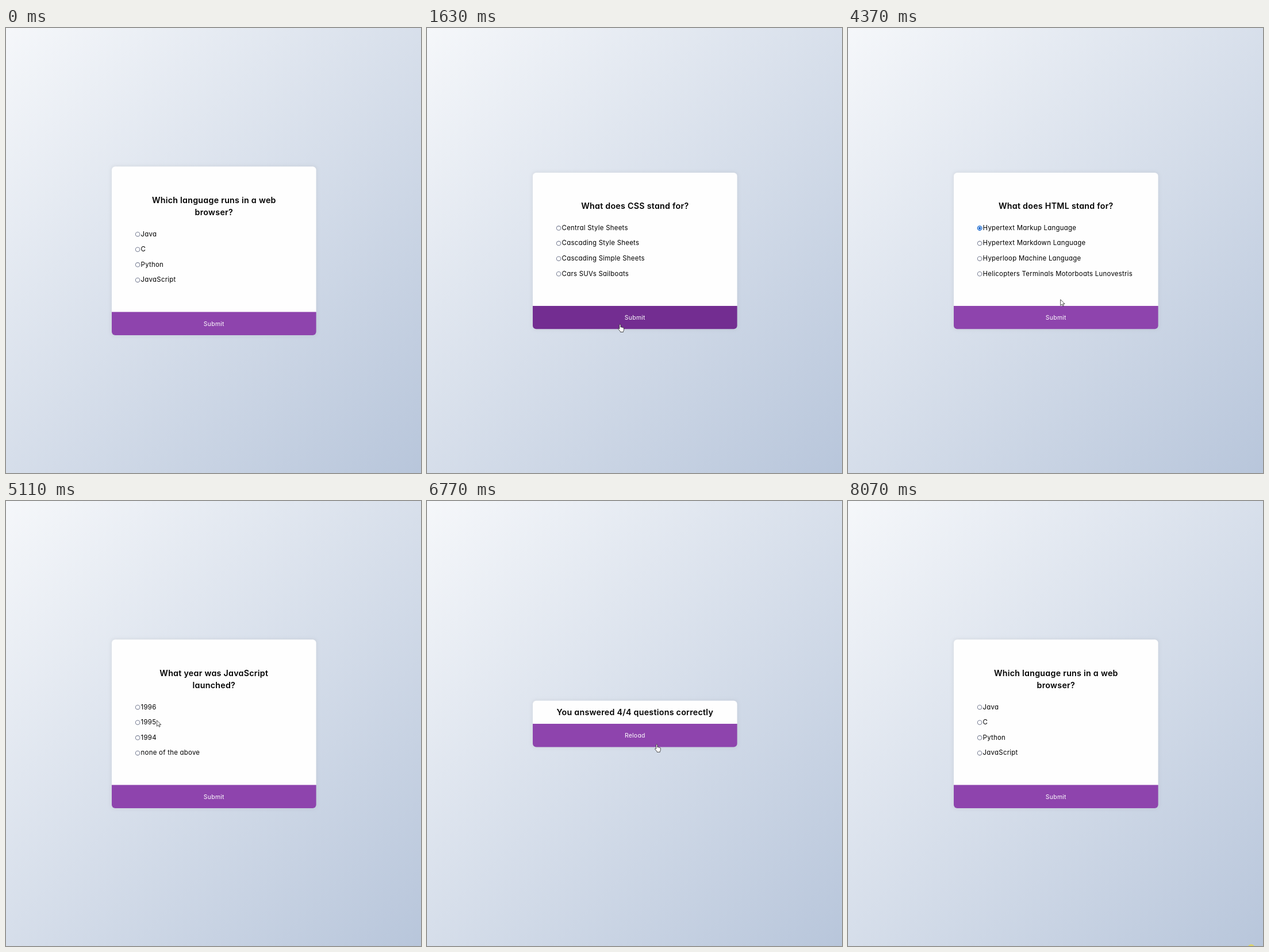
These frames come from a looping animation (722x775 px, 8140 ms). An HTML page:

```html
<!DOCTYPE html>
<html lang="en">
<head>
<meta charset="utf-8">
<title>Quiz</title>
<style>
  html, body { margin: 0; width: 100%; height: 100%; overflow: hidden; }
  body { background: linear-gradient(315deg, #b8c6db, #f5f7fa); }
  svg { display: block; width: 722px; height: 775px; }
  text { font-family: Inter, "Open Sans", sans-serif; font-feature-settings: "cv11"; letter-spacing: .27px; }
  .title { font-size: 14.24px; font-weight: 600; text-anchor: middle; }
  .option { font-size: 11.4px; }
  .action { font-size: 10.44px; fill: #fff; text-anchor: middle; }
  .shadow { fill: rgba(100, 100, 100, .1); filter: blur(3px); }
  .panel { fill: #fefefe; }
  .button { fill: #8e44ad; }
  .button.hover { fill: #732d91; }
  .ring { fill: #fff; stroke: #7d8398; stroke-width: 1.1; }
  .dot { fill: #0a5fcc; visibility: hidden; }
  .on .ring { stroke: #0a5fcc; stroke-width: 1.3; }
  .on .dot { visibility: visible; }
  .pointer { fill: #fff; stroke: #222; stroke-width: .8; stroke-linejoin: round; }
</style>
</head>
<body>
<svg viewBox="0 0 722 775">
  <g id="screens"></g>
  <circle id="spot" cx="701.5" cy="778.5" r="6.5" fill="#ddd56c"/>
  <g id="cursor">
    <path id="arrow" class="pointer" d="M.4.4V10.8L2.8 8.6 4.5 12 6.1 11.3 4.5 8H7.8Z"/>
    <path id="hand" class="pointer" d="M-1.2 8V1.1a1.1 1.1 0 0 1 2.2 0V5q1.8-.6 2 .4 1.7-.4 1.9.5 1.6-.2 1.6.9v2.6q0 1.6-1 3V13.5H.4V12.6L-3 8.6q-.6-1 .4-1.4.8 0 1.4.8Z"/>
  </g>
</svg>
<script>
const LOOP = 8140, ENTER = 450, RELOAD = 7030, EXIT = 7870, SPOT = 8070;
const STEP = (EXIT - ENTER) / 107, PAUSE = 70;
const rem = 16 * .593;
const LINE = 2.25 * rem, ROW = 2.8 * rem, BUTTON_H = 4.25 * rem;
const CENTER_X = 361.8, CENTER_Y = 388.1, LEFT = 184, RIGHT = 539.6, LABEL_X = 234.6;

// from: time shown, picked: time the answer is chosen, press: where Submit is clicked
const SCREENS = [
  { title: ["Which language runs in a web", "browser?"],
    options: ["Java", "C", "Python", "JavaScript"],
    from: 0, answer: 3, picked: 1280, press: [336, 516] },
  { title: ["What does CSS stand for?"],
    options: ["Central Style Sheets", "Cascading Style Sheets", "Cascading Simple Sheets", "Cars SUVs Sailboats"],
    from: 1560, answer: 1, picked: 2890, press: [364, 489] },
  { title: ["What does HTML stand for?"],
    options: ["Hypertext Markup Language", "Hypertext Markdown Language", "Hyperloop Machine Language",
      "Helicopters Terminals Motorboats Lunovestris"],
    from: 3520, answer: 0, picked: 3940, press: [394, 502] },
  { title: ["What year was JavaScript", "launched?"],
    options: ["1996", "1995", "1994", "none of the above"],
    from: 4650, answer: 1, picked: 5160, press: [390, 512] },
  { title: ["You answered 4/4 questions correctly"], options: [], action: "Reload", from: 5570 }
];

const $ = id => document.getElementById(id);
const show = (node, visible) => node.setAttribute("visibility", visible ? "visible" : "hidden");

function add(parent, tag, attrs, text = "") {
  const node = document.createElementNS("http://www.w3.org/2000/svg", tag);
  for (const key in attrs) node.setAttribute(key, attrs[key]);
  node.textContent = text;
  return parent.appendChild(node);
}

function build(screen) {
  const { title, options, action = "Submit" } = screen;
  const quiz = options.length > 0;
  const height = (quiz ? 26.45 : 6.25) * rem + LINE * title.length;
  const top = CENTER_Y - height / 2, bottom = top + height, buttonTop = bottom - BUTTON_H;
  const group = add($("screens"), "g", {});
  add(group, "rect", { class: "shadow", x: LEFT - 1, y: top - 1, width: RIGHT - LEFT + 2, height: height + 2, rx: 6 });
  add(group, "path", { class: "panel",
    d: `M${LEFT} ${buttonTop + .5}V${top + 6}a6 6 0 0 1 6-6H${RIGHT - 6}a6 6 0 0 1 6 6V${buttonTop + .5}Z` });
  const button = add(group, "path", { class: "button",
    d: `M${LEFT} ${buttonTop}H${RIGHT}V${bottom - 6}a6 6 0 0 1-6 6H${LEFT + 6}a6 6 0 0 1-6-6Z` });
  title.forEach((line, i) => add(group, "text", {
    class: "title", x: CENTER_X, y: top + (quiz ? 5 : 1) * rem + 15.8 + i * LINE
  }, line));
  const rows = options.map((label, i) => {
    const y = buttonTop - 132 + i * ROW;
    const row = add(group, "g", {});
    add(row, "circle", { class: "ring", cx: 229.1, cy: y - 3.4, r: 3.7 });
    add(row, "circle", { class: "dot", cx: 229.1, cy: y - 3.4, r: 2.1 });
    const text = add(row, "text", { class: "option", x: LABEL_X, y }, label);
    return { row, y, right: LABEL_X + text.getComputedTextLength() };
  });
  add(group, "text", { class: "action", x: CENTER_X, y: buttonTop + 23.9 }, action);
  Object.assign(screen, { group, button, rows, buttonTop, bottom });
}

// Each question: travel to the answer, rest there, then travel to the button and rest.
function buildPath() {
  const path = [[ENTER, 713, 763]];
  SCREENS.slice(0, -1).forEach((s, i) => {
    const answer = [262, s.rows[s.answer].y - 7.6], next = SCREENS[i + 1].from;
    path.push([s.picked - PAUSE, ...answer], [s.picked + PAUSE, ...answer],
      [next - PAUSE, ...s.press], [next + 2 * PAUSE, ...s.press]);
  });
  return path.concat([[5860, 430, 518], [6130, 430, 518], [6270, 562, 553],
    [6960, 385, 412], [RELOAD, 385, 412], [7800, 685, 763]]);
}

function tipAt(t) {
  const i = path.findIndex(stop => stop[0] > t);
  if (i <= 0) return path.at(i).slice(1);
  const [t0, x0, y0] = path[i - 1], [t1, x1, y1] = path[i];
  const k = 1 - (1 - (t - t0) / (t1 - t0)) ** 2;
  return [x0 + (x1 - x0) * k, y0 + (y1 - y0) * k];
}

const onButton = (s, [x, y]) => x > LEFT && x < RIGHT && y >= s.buttonTop && y < s.bottom;
const onLabel = (s, [x, y]) =>
  s.rows.some(r => x >= LABEL_X && x < r.right && y > r.y - 12.5 && y < r.y + 4.5);

function render(t) {
  const now = t < ENTER ? t : ENTER + STEP * Math.floor((t - ENTER) / STEP);
  const quizTime = t < RELOAD ? now + 1 : 0;
  const screen = SCREENS.findLast(s => s.from <= quizTime);
  const tip = tipAt(now), present = t >= ENTER && t < EXIT;
  const hand = onButton(screen, tip) || onLabel(screen, tip);

  SCREENS.forEach(s => { s.group.style.display = s === screen ? "" : "none"; });
  screen.rows.forEach((r, i) =>
    r.row.setAttribute("class", i === screen.answer && quizTime >= screen.picked ? "on" : ""));
  // The button reacts one step after the pointer arrives.
  screen.button.classList.toggle("hover", present && onButton(screen, tipAt(now - STEP)));

  $("cursor").setAttribute("transform", `translate(${tip})`);
  show($("arrow"), present && !hand);
  show($("hand"), present && hand);
  show($("spot"), t >= SPOT);
}

SCREENS.forEach(build);
const path = buildPath();
const begin = performance.now();
function tick() {
  render((performance.now() - begin) % LOOP);
  requestAnimationFrame(tick);
}
tick();
</script>
</body>
</html>
```
